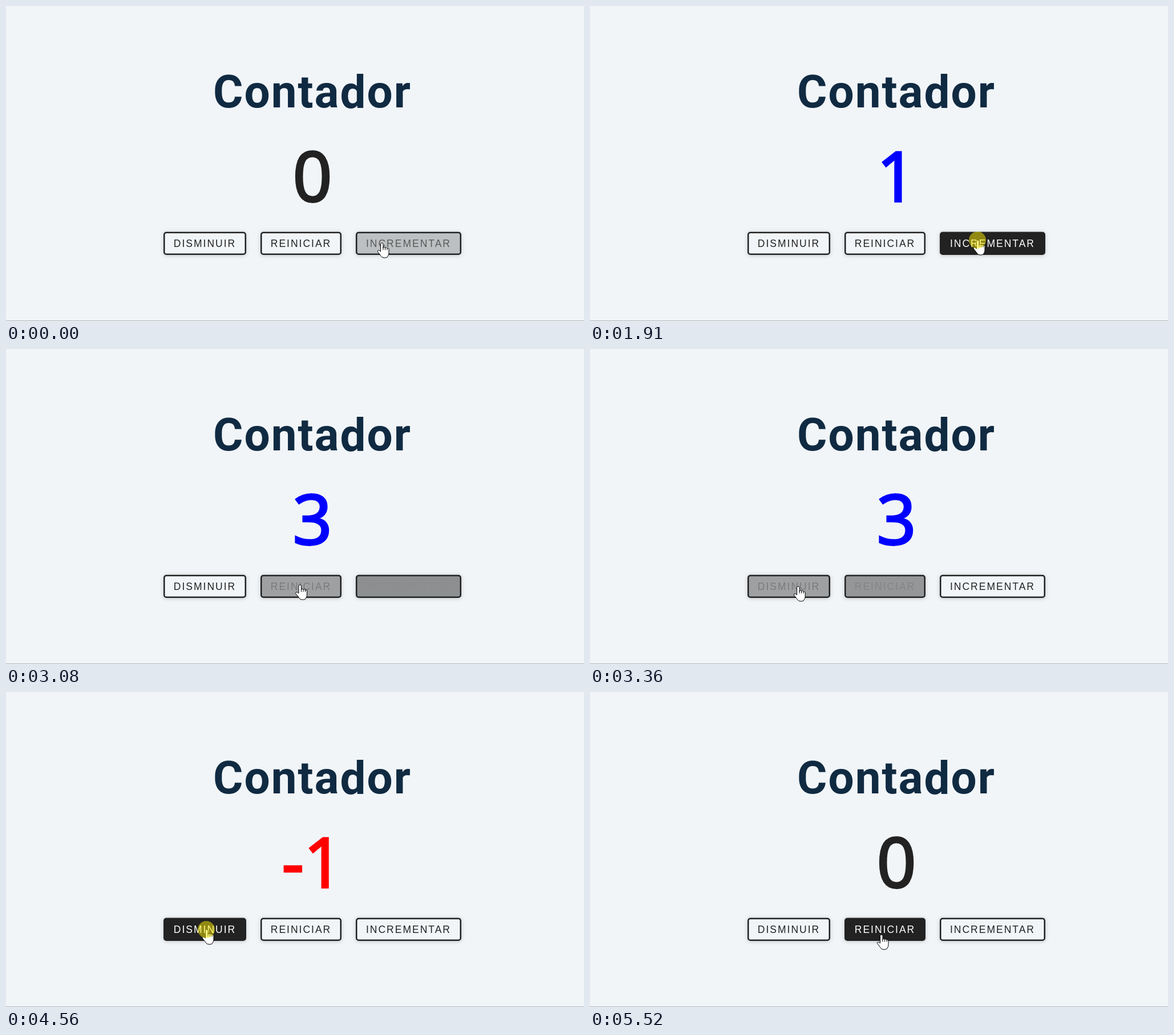
An HTML page for the animation above (6.19 s loop, 1013x553 px).

```html
<!DOCTYPE html>
<html lang="es">
<head>
<meta charset="utf-8">
<title>Contador</title>
<style>
  html, body { margin: 0; width: 100%; height: 100%; overflow: hidden; background: #f1f5f8; }
  svg { display: block; }
  text { text-anchor: middle; }
  .title { font: 700 80px Roboto, sans-serif; letter-spacing: 2px; fill: #102a42; }
  .value { font: 400 120px "Open Sans", sans-serif; stroke-width: 3.75px; }
  .label { font: 17.5px "Liberation Sans", Arial, sans-serif; letter-spacing: 2px; }
  .base { fill: #f1f5f8; filter: drop-shadow(0 1.25px 3.75px rgba(0, 0, 0, .2)); }
  .face { fill: #222; stroke: #222; stroke-width: 2.5px; }
  .hand { fill: #fff; stroke: #000; stroke-linejoin: round; }
</style>
</head>
<body>
<svg width="1013" height="553" viewBox="0 0 1013 553">
  <rect y="552" width="1013" height="1" fill="#b4b7b9"/>
  <text class="title" x="537" y="178">Contador</text>
  <text class="value" id="value" x="537" y="343.3"></text>
  <g id="buttons"></g>
  <g id="pointer">
    <path class="hand" d="M-1.5 2Q-1.5 0 .7 0Q3 0 3 2V9Q3 7 4.8 7Q6.5 7 6.5 9Q6.8 7.7 8.3 7.7Q10 8 10 10Q10.3 9 11.5 9Q13 9.3 13 11V18Q13 21 11.3 23Q10.5 26 7 26H4Q1 26-1 22.5L-6.5 15.5Q-7.5 13.5-5.5 13Q-4 12.5-2.8 14L-1.5 15ZM3 8V12.5M6.5 9V12.5M10 10V12.5"/>
    <circle id="press" r="15" fill="rgba(255, 240, 0, .5)"/>
  </g>
</svg>
<script>
const LOOP = 6190, FADE = 300, HOLD = 120, GAP = 25;

const buttons = [
  { label: "DISMINUIR", width: 145, apply: v => v - 1 },
  { label: "REINICIAR", width: 142, apply: () => 0 },
  { label: "INCREMENTAR", width: 185, apply: v => v + 1 }
];

// The pointer rests between moves
const start = { x: 600, y: 416 };
const moves = [
  { at: -85, duration: 80, x: 658, y: 416 },
  { at: 20, duration: 220, x: 665, y: 410 },
  { at: 420, duration: 160, x: 679, y: 411 },
  { at: 2830, duration: 570, x: 351, y: 417 },
  { at: 4690, duration: 570, x: 510, y: 426 }
];
const presses = [1190, 1910, 2450, 3500, 3830, 4100, 4370, 4560, 5380];

const byId = id => document.getElementById(id);
const clamp = k => Math.max(0, Math.min(1, k));
const easeOut = k => 1 - (1 - k) ** 1.2;

function add(parent, tag, attributes) {
  const node = document.createElementNS("http://www.w3.org/2000/svg", tag);
  for (const name in attributes) node.setAttribute(name, attributes[name]);
  return parent.appendChild(node);
}

function layOutButtons() {
  const group = byId("buttons");
  let x = 276;
  for (const b of buttons) {
    b.x = x;
    add(group, "rect", { class: "base", x, y: 396.5, width: b.width, height: 40.5, rx: 5 });
    b.face = add(group, "rect", {
      class: "face", x: x + 1.25, y: 397.75, width: b.width - 2.5, height: 38, rx: 3.75
    });
    b.text = add(group, "text", { class: "label", x: x + b.width / 2, y: 422.8 });
    b.text.textContent = b.label;
    x += b.width + GAP;
  }
}

function pointerAt(t) {
  let { x, y } = start;
  for (const move of moves) {
    const k = easeOut(clamp((t - move.at) / move.duration));
    x += (move.x - x) * k;
    y += (move.y - y) * k;
  }
  return { x, y };
}

function isOver(button, t) {
  const { x } = pointerAt(t);
  return x >= button.x && x <= button.x + button.width;
}

// Linear fade: the share of the last FADE ms spent over the button
function hoverAmount(button, t) {
  const samples = 60;
  let inside = 0;
  for (let i = 0; i < samples; i++) inside += isOver(button, t - i * FADE / samples);
  return inside / samples;
}

function valueAt(t) {
  return presses
    .filter(time => time + HOLD <= t)
    .reduce((value, time) => buttons.find(b => isOver(b, time)).apply(value), 0);
}

function draw(t) {
  const value = valueAt(t);
  const color = value > 0 ? "#00f" : value < 0 ? "#f00" : "#222";
  const counter = byId("value");
  counter.textContent = value;
  counter.setAttribute("fill", color);
  counter.setAttribute("stroke", color);

  for (const b of buttons) {
    const k = hoverAmount(b, t), shade = Math.round(34 + 221 * k);
    b.face.setAttribute("fill-opacity", k);
    b.text.setAttribute("fill", `rgb(${shade},${shade},${shade})`);
  }

  const { x, y } = pointerAt(t);
  byId("pointer").setAttribute("transform", `translate(${x},${y})`);
  const pressed = presses.some(time => time <= t && t < time + HOLD);
  byId("press").setAttribute("visibility", pressed ? "visible" : "hidden");
}

layOutButtons();
const origin = performance.now();
function tick() {
  draw((performance.now() - origin) % LOOP);
  requestAnimationFrame(tick);
}
tick();
</script>
</body>
</html>
```
